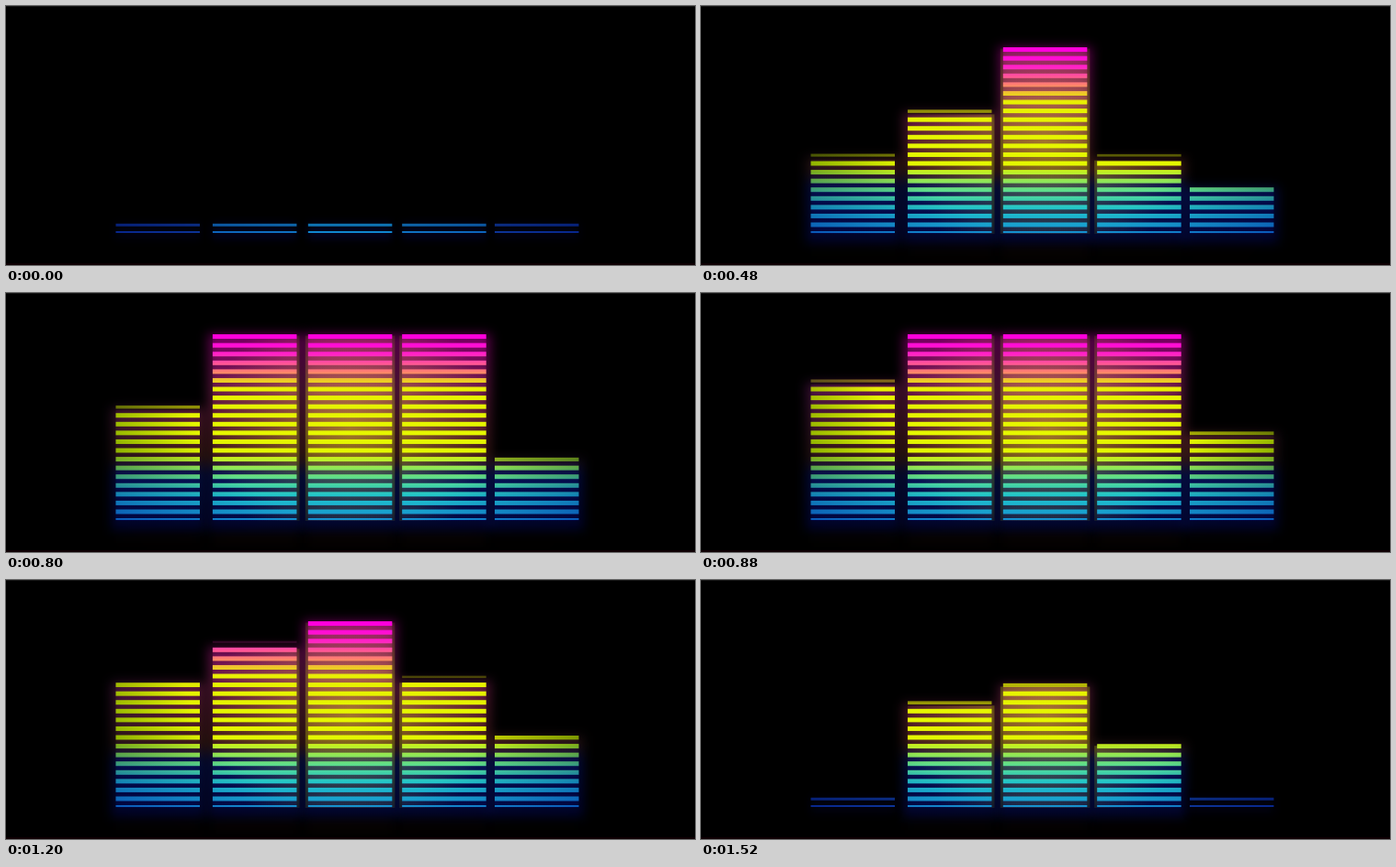
An HTML page with a canvas that plays this animation: 750x283 px, repeating every 1600 ms.

```html
<!DOCTYPE html>
<html>
<head>
<meta charset="utf-8">
<style>
html, body { margin: 0; width: 100%; height: 100%; overflow: hidden; background: #000; }
canvas { display: block; }
</style>
</head>
<body>
<canvas id="stage" width="750" height="283"></canvas>
<script>
const ctx = document.getElementById('stage').getContext('2d');
const LOOP = 1600, STEP = 80;
const PITCH = 9.57, ROW1 = 239, BASE = 249, WIDTH = 91.5, FULL = 20;

// Height of each column, in bars, after s steps
const { min, max, abs } = Math;
const dip = (s, low) => low + 2.9 * abs(s - 9);
const motions = [
  s => min(3.68 * (s - 3), dip(s, 11.5), 3.5 * (17.7 - s)),
  s => min(2.5 * s, 1.62 * (24.5 - s)),
  s => 4.23 * min(s, 21 - s),
  s => min(FULL * (s / 9) ** 1.73, 1.8 * (21.3 - s)),
  s => min(2 * (s - 3), dip(s, 5.7), 4 * (15.7 - s))
];
const columnX = c => 119.5 + 106.2 * c - 0.77 * c * c;
const idleLight = c => 1 - 0.125 * (c - 2) ** 2;
const mix = (a, b, k) => a + (b - a) * k;

function paint(gradient, stops) {
  for (const [at, color] of stops) gradient.addColorStop(at, color);
  return gradient;
}

const barPaint = paint(ctx.createLinearGradient(0, 50, 0, 250), [
  [0, '#ff00dc'], [0.08, '#ff20c8'], [0.18, '#ff8070'], [0.23, '#eccc24'],
  [0.28, '#e8f200'], [0.62, '#e4f800'], [0.76, '#5cdc8c'], [0.86, '#20c4cc'],
  [1, '#148cd0']
]);
const glowPaint = paint(ctx.createLinearGradient(0, 50, 0, 250), [
  [0, '#6c0058'], [0.27, '#5e1640'], [0.65, '#3c1a14'], [0.74, '#04104a'], [1, '#03083c']
]);
const corePaint = paint(ctx.createRadialGradient(375, 148, 0, 375, 148, 150), [
  [0, '#4c5800'], [0.35, '#343c00'], [1, '#000']
]);
const falloff = paint(ctx.createRadialGradient(373, 60, 0, 373, 60, 340), [
  [0.55, '#fff'], [1, '#6088dc']
]);

function box(x, y, w, h, alpha) {
  ctx.globalAlpha = alpha;
  ctx.fillRect(x, y, w, h);
}

function drawGlow(level, c) {
  if (level < 0.2) return;
  const x = columnX(c), top = ROW1 - level * PITCH - 3;
  ctx.fillStyle = glowPaint;
  ctx.filter = 'blur(6px)';
  box(x - 5, top, WIDTH + 10, 259 - top, 0.8);
  ctx.fillStyle = '#120504';
  box(x, 264, WIDTH, 10, 0.6 * level / FULL);
  ctx.filter = 'none';
  ctx.fillStyle = glowPaint;
  box(x, top + 2, WIDTH, BASE - top - 2, 0.35);
  ctx.fillStyle = corePaint;
  box(x - 3, top + 2, WIDTH + 6, BASE - top - 2, 1);
}

function drawIdle(level, c) {
  const x = columnX(c), light = idleLight(c), sleep = max(0, 1 - level / 2);
  ctx.fillStyle = '#04043c';
  ctx.filter = 'blur(4px)';
  box(x, 237, WIDTH, 18, 0.5 * light * sleep);
  ctx.filter = 'none';
  ctx.fillStyle = `rgb(16, ${mix(-10, 136, light)}, ${mix(110, 208, light)})`;
  box(x, 237.8, WIDTH, 3, 0.85 * sleep);
  box(x, 246, WIDTH, 2, sleep);
}

function drawBars(level, c) {
  const x = columnX(c), awake = min(1, level / 2);
  ctx.fillStyle = barPaint;
  box(x, 246, WIDTH, 2, awake);
  for (let i = 0; i < level + 1; i++) {
    const part = min(1, level - i + 1);
    const height = 2 + 3 * part;
    const y = ROW1 - i * PITCH + 1 - part;
    box(x, y - height / 2, WIDTH, height, (i ? 1 : awake) * mix(0.15, 1, part));
  }
}

function draw(ms) {
  const step = max(0, Math.floor(ms / STEP) - 1);
  const levels = motions.map(move => max(0, min(FULL, move(step))));
  ctx.fillStyle = '#000';
  box(0, 0, 750, 283, 1);

  ctx.globalCompositeOperation = 'lighter';
  levels.forEach(drawGlow);
  ctx.globalCompositeOperation = 'source-over';
  levels.forEach(drawIdle);
  levels.forEach(drawBars);

  ctx.globalCompositeOperation = 'multiply';
  ctx.fillStyle = falloff;
  box(0, 0, 750, 283, 1);
  ctx.globalCompositeOperation = 'source-over';

  ctx.fillStyle = '#141414';
  box(0, 0, 750, 1, 1);
  ctx.fillStyle = '#0e0003';
  box(0, 281, 750, 2, 1);
}

function tick() {
  draw(performance.now() % LOOP);
  requestAnimationFrame(tick);
}
tick();
</script>
</body>
</html>
```
